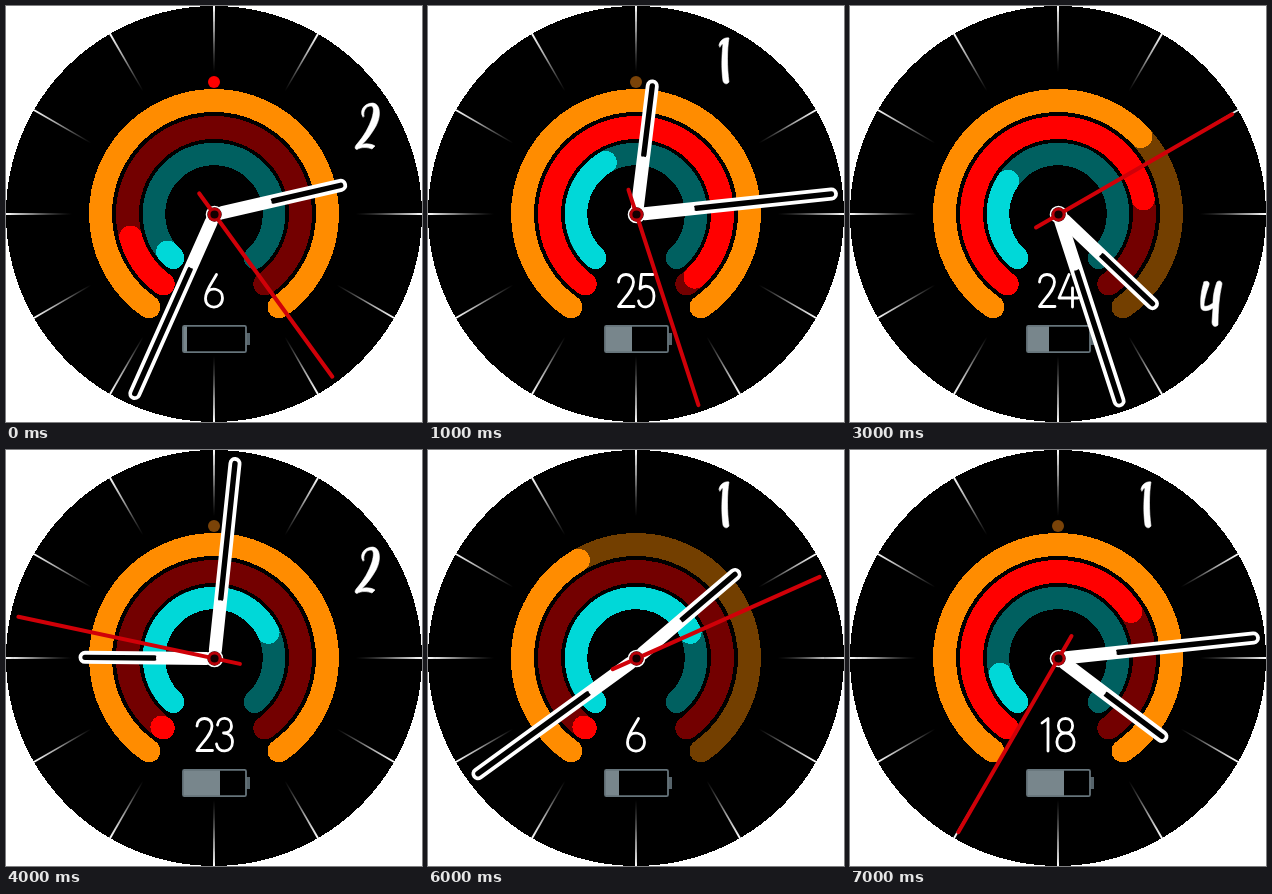
These frames come from a looping animation (416x416 px, 8000 ms). An HTML page:

```html
<!DOCTYPE html>
<html lang="en">
<head>
<meta charset="utf-8">
<title>Watch face</title>
<style>
  html, body { margin: 0; width: 100%; height: 100%; overflow: hidden; background: #fff; }
  svg { display: block; width: 100vw; height: 100vh; }
</style>
</head>
<body>
<svg id="face" viewBox="0 0 416 416" fill="none" stroke-linecap="round" stroke-linejoin="round">
  <defs>
    <linearGradient id="fade" gradientUnits="userSpaceOnUse" x1="0" y1="-208" x2="0" y2="-142">
      <stop offset="0" stop-color="#fff"/>
      <stop offset=".4" stop-color="#ccc" stop-opacity=".8"/>
      <stop offset="1" stop-color="#aaa" stop-opacity="0"/>
    </linearGradient>
  </defs>
  <circle cx="208" cy="208" r="208" fill="#000" shape-rendering="crispEdges"/>
  <g id="ticks" transform="translate(208 208)" fill="url(#fade)"></g>
  <circle id="dot" cx="208" cy="76" r="6"/>
  <g id="rings" shape-rendering="crispEdges"></g>
  <g id="hourMark" stroke="#fff" fill="#fff"></g>
  <g id="date" stroke="#fff" stroke-width="2.8"></g>
  <g id="battery">
    <rect x="240" y="327" width="4" height="12" fill="#56646b"/>
    <rect id="charge" x="177" y="320" height="26" fill="#78868c"/>
    <rect x="177" y="319.8" width="63" height="26.4" rx="1.5" stroke="#66747b" stroke-width="1.8"/>
  </g>
  <g transform="translate(208.5 208.5)">
    <g id="hour"></g>
    <g id="minute"></g>
    <circle r="8" fill="#000" stroke="#fff" stroke-width="1.6"/>
    <path id="second" d="M0 26V-200.5" stroke="#d00008" stroke-width="4"/>
    <circle r="5.5" fill="#120000" stroke="#b80008" stroke-width="2.8"/>
  </g>
</svg>
<script>
const $ = id => document.getElementById(id);
const START = [215, 216, 223];
const RINGS = [
  { r: 113.5, w: 23, on: '#ff8c00', off: '#733f00' },
  { r: 86.5, w: 23, on: '#ff0000', off: '#730000' },
  { r: 60, w: 22.5, on: '#00d8d8', off: '#006060' }
];

// time: h, m, s; ring ends in degrees; charge is the right edge of the fill
const STATES = [
  { time: [2, 34, 24], mark: 2, date: '6', ends: [505, 254.5, 231], charge: 181, dot: '#ff0000' },
  { time: [12, 14, 27], mark: 1, date: '25', ends: [505, 497, 329.5], charge: 204, dot: '#7a4308' },
  { time: [10, 4, 15], mark: 2, date: '14', ends: [505, 380, 290], charge: 210, dot: '#7a4308' },
  { time: [4, 27, 10], mark: 4, date: '24', ends: [407, 440, 303.5], charge: 199 },
  { time: [9, 1, 47], mark: 2, date: '23', ends: [505, 217, 425], charge: 214, dot: '#7a4308' },
  { time: [7, 56, 42], mark: 6, date: '16', ends: [450, 300, 380], charge: 204 },
  { time: [1, 39, 11], mark: 1, date: '6', ends: [329.5, 217, 425], charge: 191 },
  { time: [4, 14, 35], mark: 1, date: '18', ends: [505, 417.5, 254.5], charge: 214, dot: '#7a4308' }
];

// thin numerals: path and width
const DIGITS = {
  1: ['M1 6L7 1.5V34', 8],
  2: ['M1.5 9C1.5-1 16.5-1 16.5 9C16.5 17 8 24 1.5 33.5H17', 17],
  3: ['M2 8C3-1 16-1 16 9C16 14 12 16 8 16C13 16 17 19 17 25C17 36.5 2 36.5 1 27', 17],
  4: ['M11 1.5L1 25H20M14.5 15V34', 20],
  5: ['M16 1.5H4.5L3 16C8 11 17 13 17 23C17 36 3 37 1.5 28', 18],
  6: ['M12 1.5C8 9 1 17 1 25.5C1 37 18 37 18 25C18 15 5 13 2 21', 19],
  8: ['M9.5 16C0 16 0 1.5 9.5 1.5S19 16 9.5 16C-2 16-2 34 9.5 34S21 16 9.5 16', 19]
};

// brush numerals
const MARKS = {
  1: 'M291 39C292 34 297 31 301 32C299 43 299 62 301 76C299 79 296 78 295 75C293 61 294 47 295 38C294 38 293 39 292 41Z',
  2: 'M357 111C353 105 358 97 367 97C375 98 375 111 370 120C366 127 361 134 356 138.5C360 137 366 138 369 140L366 143C361 141 355 141 351 143.5C348 143 349 140 351 138C358 130 363 121 366 112C368 105 368 100 365 100C360 100 357 105 358 110Z',
  4: 'M354 276C357 274 360 276 359 279C356 287 354 295 354 300C357 301 360 299 363 297C363 289 365 281 367 276C369 274 372 275 372 278C369 290 368 306 368 319C365 322 362 320 362 316L363 302C359 305 352 306 351 302C350 295 351 285 354 276Z',
  6: 'M212 352C204 362 197 374 197 386C198 400 214 402 218 390C220 379 212 374 205 379C207 369 211 361 215 354ZM204 383C210 378 214 383 213 389C211 397 203 397 202 389Z'
};

function polar(r, deg) {
  const a = deg * Math.PI / 180;
  return `${(208 + r * Math.sin(a)).toFixed(2)} ${(208 - r * Math.cos(a)).toFixed(2)}`;
}

function arc(r, from, to) {
  return `M${polar(r, from)}A${r} ${r} 0 ${to - from > 180 ? 1 : 0} 1 ${polar(r, to)}`;
}

function hand(len) {
  const tip = 6.5 - len;
  return `<path d="M0-8V${tip}" stroke="#fff" stroke-width="13"/>
    <path d="M0-60V${tip}" stroke="#000" stroke-width="5.4"/>
    <path d="M0-10V-55" stroke="#fff" stroke-width="7"/>`;
}

function turn(id, deg) {
  $(id).setAttribute('transform', `rotate(${deg})`);
}

function dateText(text) {
  const gap = 3;
  const total = [...text].reduce((sum, c) => sum + DIGITS[c][1] + gap + (c === '1' ? 4 : 0), -gap);
  let x = 208 - total / 2;
  return [...text].map(c => {
    const [d, w] = DIGITS[c];
    const out = `<path transform="translate(${x} 267)" d="${d}"/>`;
    x += w + gap + (c === '1' ? 4 : 0);
    return out;
  }).join('');
}

$('ticks').innerHTML = Array.from({ length: 12 }, (_, i) =>
  `<path d="M-1-208H1L.6-142H-.6Z" transform="rotate(${i * 30})"/>`).join('');

$('rings').innerHTML = RINGS.map((g, i) =>
  `<path d="${arc(g.r, START[i], 720 - START[i])}" stroke="${g.off}" stroke-width="${g.w}"/>
   <path id="ring${i}" stroke="${g.on}" stroke-width="${g.w}"/>`).join('');

$('hour').innerHTML = hand(136);
$('minute').innerHTML = hand(202.5);

function show(state) {
  const [h, m, s] = state.time;
  turn('hour', h % 12 * 30 + m / 2);
  turn('minute', m * 6);
  turn('second', s * 6);
  [...$('ticks').children].forEach((t, i) =>
    t.setAttribute('visibility', i === state.mark ? 'hidden' : 'visible'));
  RINGS.forEach((g, i) => $('ring' + i).setAttribute('d', arc(g.r, START[i], state.ends[i])));
  $('dot').setAttribute('fill', state.dot || 'none');
  $('charge').setAttribute('width', state.charge - 177);
  $('hourMark').innerHTML = `<path d="${MARKS[state.mark]}" stroke-width=".6" fill-rule="evenodd"/>`;
  $('date').innerHTML = dateText(state.date);
}

let last = -1;
const begin = performance.now();
function tick() {
  const i = Math.floor((performance.now() - begin) / 1000) % STATES.length;
  if (i !== last) show(STATES[last = i]);
  requestAnimationFrame(tick);
}
tick();
</script>
</body>
</html>
```
